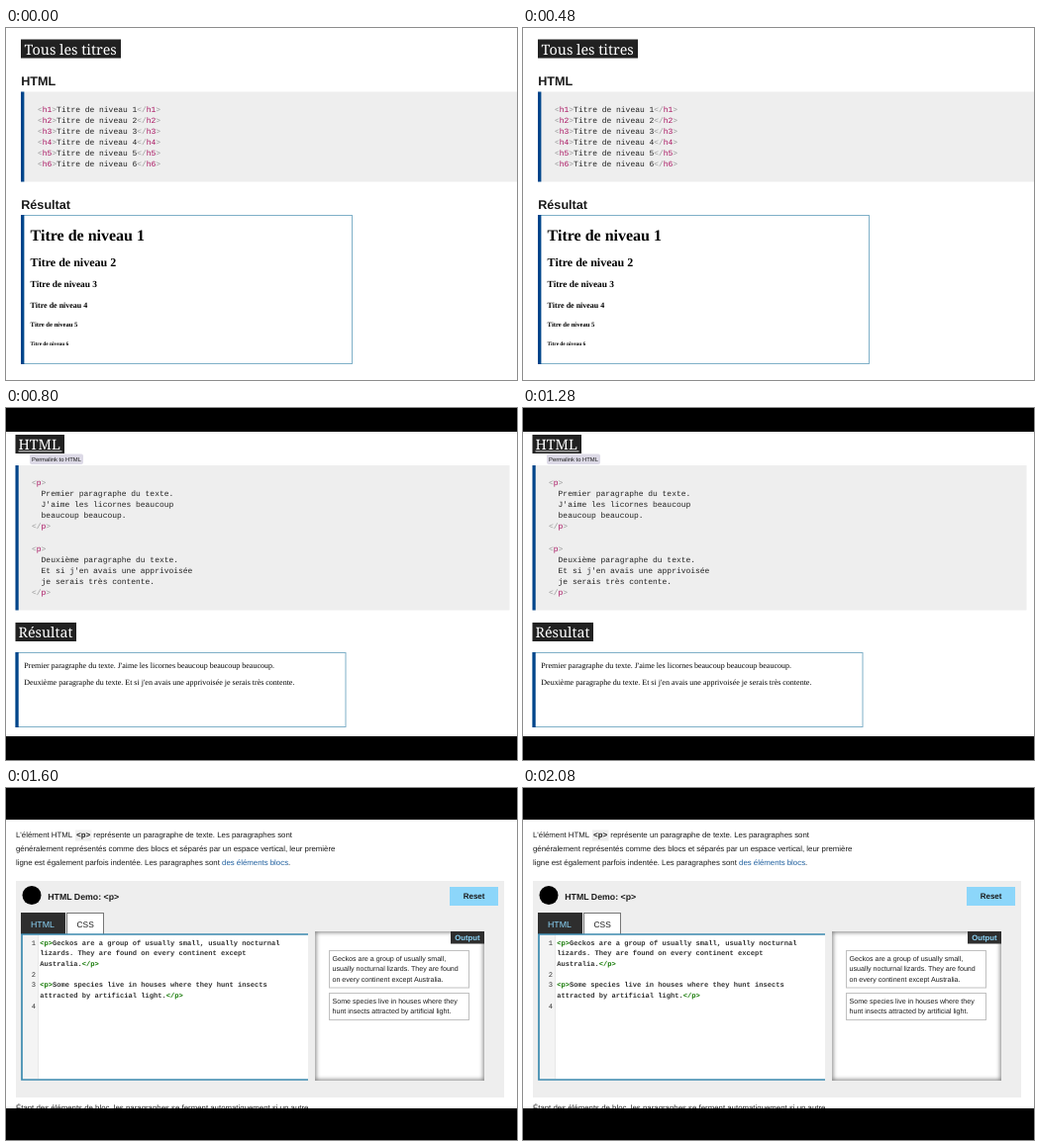
Write an HTML page that moves like this. It is 516 px wide and 356 px high and loops after 2400 ms.

```html
<!DOCTYPE html>
<html lang="fr">
<head>
<meta charset="utf-8">
<title>Titres et paragraphes</title>
<style>
html, body { margin: 0; width: 100%; height: 100%; overflow: hidden; background: #fff; }
svg { display: block; width: 516px; height: 356px; }
text { font-family: "Liberation Sans", Arial, sans-serif; fill: #1b1b1b; text-rendering: geometricPrecision; }
.bold { font-weight: 700; }
.title { font-size: 12.65px; font-weight: 700; }
.slab { font: 300 14.3px "Noto Serif", serif; fill: #fff; }
.serif { font: 8px "Liberation Serif", Times, serif; fill: #000; }
.code { font: 7.96px "Liberation Mono", Courier, monospace; fill: #222; }
.code .b { fill: #999; }
.code .t { fill: #a8125f; }
.prose { font-size: 7.83px; }
.editor { font: 700 7.08px "Liberation Mono", Courier, monospace; fill: #333; }
.editor .g { fill: #170; }
.nums { font: 7.08px "Liberation Mono", Courier, monospace; fill: #333; text-anchor: end; }
.demo { font-size: 7.1px; }
.dark { fill: #212121; }
.tab { fill: #2e2e2e; }
.grey { fill: #eee; }
.blue { fill: #00458b; }
.sky { fill: #8cd6fa; }
.box { fill: #fff; stroke: #7fb0c8; }
.card { fill: #fff; stroke: #c0c0c0; }
.shadow { fill: none; stroke: #777; stroke-width: 4; filter: blur(2px); }
.slide { visibility: hidden; animation: second 2400ms step-end infinite; }
.slide.last { animation-name: third; }
@keyframes second { 0% { visibility: hidden; } 33.3333%, 100% { visibility: visible; } }
@keyframes third { 0% { visibility: hidden; } 66.6667%, 100% { visibility: visible; } }
</style>
</head>
<body>
<svg viewBox="0 0 516 356">
  <defs>
    <clipPath id="pane"><rect x="312" y="145" width="171" height="151"/></clipPath>
  </defs>

  <!-- Headings -->
  <g>
    <rect width="516" height="356" fill="#fff"/>
    <rect class="dark" x="15" y="11.5" width="101" height="19"/>
    <text class="slab" x="18.5" y="26.5">Tous les titres</text>
    <text class="title" x="15.2" y="58">HTML</text>
    <rect class="grey" x="15" y="64.5" width="501" height="91"/>
    <rect class="blue" x="15" y="64.5" width="3.4" height="91"/>
    <g id="tags"></g>
    <text class="title" x="15.2" y="183">Résultat</text>
    <rect class="box" x="15.5" y="189.5" width="334" height="150"/>
    <rect class="blue" x="15" y="189" width="3.4" height="151"/>
    <g id="levels"></g>
  </g>

  <!-- Paragraphs -->
  <g class="slide">
    <rect width="516" height="356"/>
    <rect y="24" width="516" height="308" fill="#fff"/>
    <rect class="dark" x="9.5" y="27" width="49.5" height="19"/>
    <text class="slab" x="12.5" y="42">HTML</text>
    <rect x="12.5" y="43.4" width="44" height="0.9" fill="#fff"/>
    <rect class="grey" x="9.5" y="58" width="499" height="146.5"/>
    <rect class="blue" x="9.5" y="58" width="3.2" height="146.5"/>
    <rect x="24" y="46.5" width="54" height="10.5" rx="2" fill="#dcd9e6"/>
    <text x="26" y="53.7" font-size="5.84">Permalink to HTML</text>
    <text class="code" y="77.6">
      <tspan x="26"><tspan class="b">&lt;</tspan><tspan class="t">p</tspan><tspan class="b">&gt;</tspan></tspan>
      <tspan x="35.6" dy="11.17">Premier paragraphe du texte.</tspan>
      <tspan x="35.6" dy="11.17">J'aime les licornes beaucoup</tspan>
      <tspan x="35.6" dy="11.17">beaucoup beaucoup.</tspan>
      <tspan x="26" dy="11.17"><tspan class="b">&lt;/</tspan><tspan class="t">p</tspan><tspan class="b">&gt;</tspan></tspan>
      <tspan x="26" dy="22.34"><tspan class="b">&lt;</tspan><tspan class="t">p</tspan><tspan class="b">&gt;</tspan></tspan>
      <tspan x="35.6" dy="11.17">Deuxième paragraphe du texte.</tspan>
      <tspan x="35.6" dy="11.17">Et si j'en avais une apprivoisée</tspan>
      <tspan x="35.6" dy="11.17">je serais très contente.</tspan>
      <tspan x="26" dy="11.17"><tspan class="b">&lt;/</tspan><tspan class="t">p</tspan><tspan class="b">&gt;</tspan></tspan>
    </text>
    <rect class="dark" x="9.5" y="217" width="61.5" height="19"/>
    <text class="slab" x="12.5" y="232">Résultat</text>
    <rect class="box" x="10" y="247.5" width="333" height="75"/>
    <rect class="blue" x="9.5" y="247" width="3.2" height="76"/>
    <text class="serif" x="18.3" y="262.5">Premier paragraphe du texte. J'aime les licornes beaucoup beaucoup beaucoup.</text>
    <text class="serif" x="18.3" y="280">Deuxième paragraphe du texte. Et si j'en avais une apprivoisée je serais très contente.</text>
  </g>

  <!-- Live demo -->
  <g class="slide last">
    <rect width="516" height="356"/>
    <rect y="32" width="516" height="292" fill="#fff"/>
    <rect class="grey" x="70" y="42.5" width="16.5" height="11"/>
    <text class="prose" x="10" y="50.3">L'élément HTML</text>
    <text class="code bold" x="71" y="50.3" style="font-weight:700">&lt;p&gt;</text>
    <text class="prose" x="88.3" y="50.3">représente un paragraphe de texte. Les paragraphes sont</text>
    <text class="prose" x="10" y="64.3">généralement représentés comme des blocs et séparés par un espace vertical, leur première</text>
    <text class="prose" x="10" y="78.2">ligne est également parfois indentée. Les paragraphes sont <tspan fill="#1f5f9e">des éléments blocs</tspan>.</text>

    <rect class="grey" x="10" y="94" width="493" height="219"/>
    <circle cx="26" cy="108.5" r="9.5"/>
    <text class="bold" x="42.3" y="113.2" font-size="8.75">HTML Demo: &lt;p&gt;</text>
    <rect class="sky" x="448" y="100" width="49" height="19"/>
    <text class="bold" x="461.7" y="112.3" font-size="8">Reset</text>

    <rect class="tab" x="15" y="126" width="45" height="22"/>
    <text class="sky" x="25" y="140.7" font-size="8.8">HTML</text>
    <rect x="61.5" y="126.5" width="37" height="22" fill="#fff" stroke="#777"/>
    <text x="71.5" y="140.7" font-size="8.4">CSS</text>
    <rect x="16" y="148" width="289" height="147" fill="#fff"/>
    <rect x="17" y="149" width="15.5" height="145" fill="#f4f4f4"/>
    <rect x="32.2" y="149" width="0.6" height="145" fill="#ddd"/>
    <path d="M305 148H16V295H305" fill="none" stroke="#3b89ae" stroke-width="1.7"/>
    <text class="nums" y="158.7">
      <tspan x="30">1</tspan><tspan x="30" dy="31.9">2</tspan><tspan x="30" dy="10.65">3</tspan><tspan x="30" dy="21.3">4</tspan>
    </text>
    <text class="editor" y="158.7">
      <tspan x="34.3"><tspan class="g">&lt;p&gt;</tspan>Geckos are a group of usually small, usually nocturnal</tspan>
      <tspan x="34.3" dy="10.65">lizards. They are found on every continent except</tspan>
      <tspan x="34.3" dy="10.65">Australia.<tspan class="g">&lt;/p&gt;</tspan></tspan>
      <tspan x="34.3" dy="21.3"><tspan class="g">&lt;p&gt;</tspan>Some species live in houses where they hunt insects</tspan>
      <tspan x="34.3" dy="10.65">attracted by artificial light.<tspan class="g">&lt;/p&gt;</tspan></tspan>
    </text>

    <g clip-path="url(#pane)">
      <rect x="312" y="145" width="171" height="151" fill="#fff"/>
      <rect class="shadow" x="311" y="144" width="173" height="153"/>
    </g>
    <rect class="tab" x="449" y="145" width="34" height="12.5"/>
    <text class="sky bold" x="453.3" y="154" font-size="7.7">Output</text>
    <rect class="card" x="326.5" y="164.5" width="141" height="37.5"/>
    <rect class="card" x="326.5" y="207.5" width="141" height="27"/>
    <text class="demo" y="174.7">
      <tspan x="329.5">Geckos are a group of usually small,</tspan>
      <tspan x="329.5" dy="10.7">usually nocturnal lizards. They are found</tspan>
      <tspan x="329.5" dy="10.7">on every continent except Australia.</tspan>
      <tspan x="329.5" dy="21.6">Some species live in houses where they</tspan>
      <tspan x="329.5" dy="10.7">hunt insects attracted by artificial light.</tspan>
    </text>
    <text class="prose" x="10" y="326.3">Étant des éléments de bloc, les paragraphes se ferment automatiquement si un autre</text>
    <rect y="324" width="516" height="32"/>
  </g>
</svg>
<script>
const sizes = [2, 1.5, 1.17, 1, 0.83, 0.67];
const baselines = [214.7, 241, 262.4, 282.5, 301.6, 320.6];
const mark = (cls, s) => `<tspan class="${cls}">${s}</tspan>`;
const tag = (open, name) => mark("b", open) + mark("t", name) + mark("b", "&gt;");

document.getElementById("tags").innerHTML = sizes.map((_, i) => {
  const n = i + 1;
  return `<text class="code" x="32" y="${84.6 + i * 11.17}">` +
    `${tag("&lt;", "h" + n)}Titre de niveau ${n}${tag("&lt;/", "h" + n)}</text>`;
}).join("");

document.getElementById("levels").innerHTML = sizes.map((em, i) =>
  `<text class="serif" x="24.6" y="${baselines[i]}" ` +
  `style="font-size:${em * 8}px;font-weight:700">Titre de niveau ${i + 1}</text>`
).join("");
</script>
</body>
</html>
```
